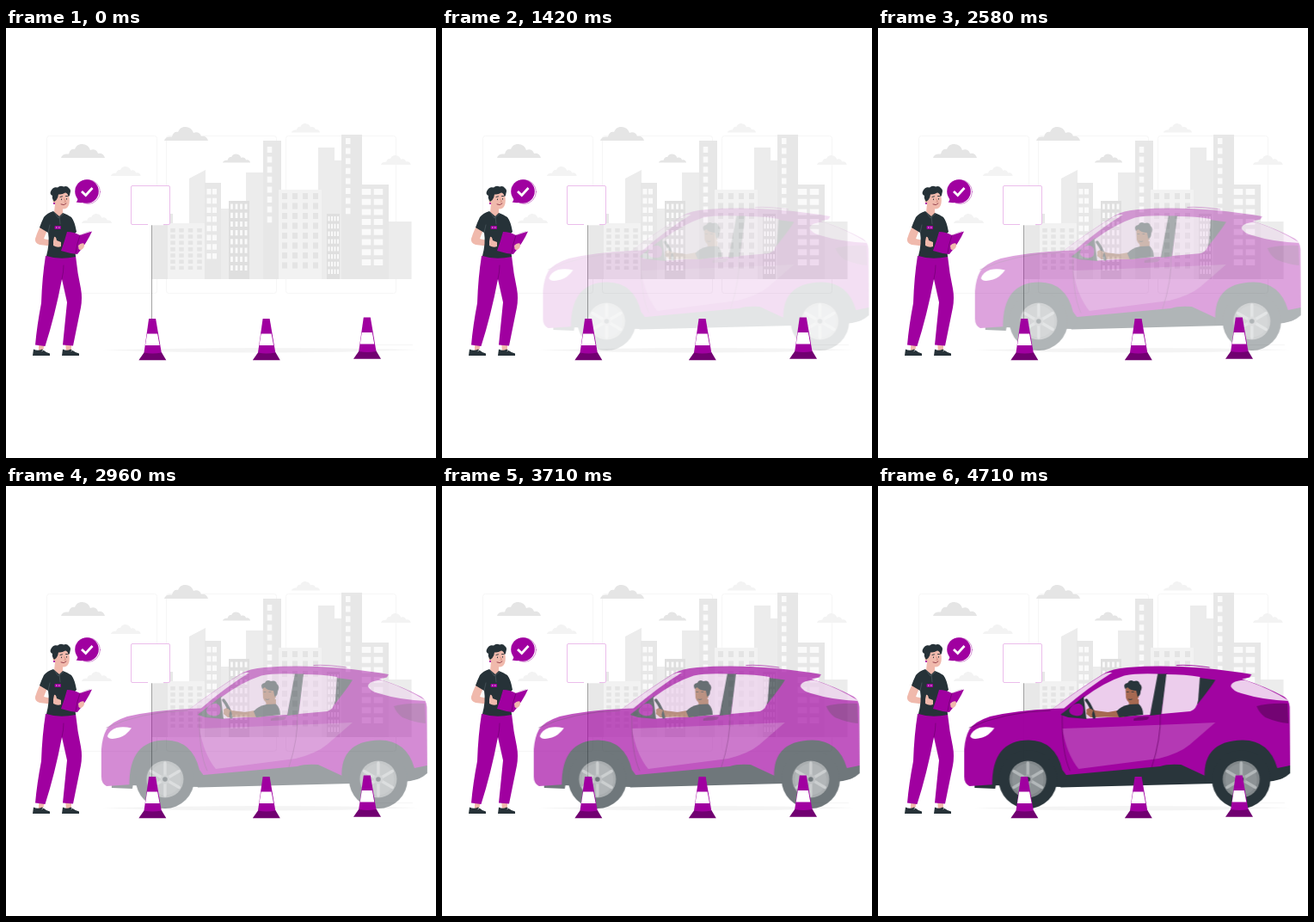
These frames come from a looping animation (500x500 px, 4.75 s). An HTML page:

```html
<!DOCTYPE html>
<html lang="en">
<head>
<meta charset="utf-8">
<title>Driving test</title>
<style>
  html, body { margin: 0; width: 100%; height: 100%; overflow: hidden; background: #fff; }
  svg { display: block; width: 100%; height: 100%; }
  .purple { fill: #a000a0; }
  .deep { fill: #710071; }
  .dark { fill: #263238; }
  .skin { fill: #f0b9ac; }
  .brown { fill: #a5674f; }
  .glass { fill: #eccdec; }
  .line { fill: none; stroke-linecap: round; stroke-linejoin: round; }
  #car { animation: arrive 4750ms ease-in infinite; }
  @keyframes arrive {
    from { opacity: 0; transform: translateX(20px); }
    to { opacity: 1; transform: none; }
  }
</style>
</head>
<body>
<svg viewBox="0 0 500 500">
  <defs>
    <path id="cloud" d="M0 16C1 12 5 11 9 11.500C10 7 13 5 16 6C18 1 22-.3 26 .2C31 .8 33 4 34 7C38 5 42 7 43 11C48 10 50 13 51 16Z"/>
    <g id="cone">
      <path class="deep" d="M-9.500 39H10.500L16 48.300H-16Z"/>
      <path class="purple" d="M-4.200 0H3.800L10.500 39.500Q0 41.500-9.800 39.500Z"/>
      <path fill="#fff" d="M-6.200 17.500H5.800L8.300 31H-8.300Z"/>
    </g>
    <g id="wheel">
      <circle r="34" class="dark"/>
      <circle r="21.500" fill="#7f8689"/>
      <circle r="18.500" fill="#8b9194"/>
      <path class="line" stroke="#b2b7b9" stroke-width="3.400" d="M0-5V-19M0 5V19M4.500-2.500L16.500-9.500M-4.500-2.500L-16.500-9.500M4.500 2.500L16.500 9.500M-4.500 2.500L-16.500 9.500"/>
      <circle r="5.500" fill="#9da2a5"/>
      <circle r="2.800" class="dark"/>
    </g>
  </defs>

  <!-- backdrop -->
  <g fill="none" stroke="#f6f6f6">
    <rect x="47.500" y="125.500" width="128" height="183" rx="3"/>
    <rect x="186.500" y="125.500" width="128" height="183" rx="3"/>
    <rect x="325.500" y="125.500" width="128" height="183" rx="3"/>
    <path d="M430 368.500H473"/>
  </g>
  <path fill="#f4f4f4" d="M112 374.500Q200 372 295 372T480 374Q390 377.500 295 377.500T112 374.500Z"/>

  <!-- city -->
  <path fill="#ececec" d="M213 175L232 165V292H213ZM250 210H260V292H250ZM279 168H300V292H279ZM363 139H382V154H391V292H363ZM445 225H471.500V292H445Z"/>
  <path fill="#e8e8e8" d="M169 229H189V216H194V292H169Z"/>
  <path fill="#e7e7e7" d="M231 180H250V292H231ZM299 131H320V292H299ZM390 124H414V292H390ZM408 182H445V292H408Z"/>
  <path fill="#f2f2f2" d="M188 227H231V292H188ZM317 188H367V292H317Z"/>
  <path fill="#dfdfdf" d="M259 201H283V292H259ZM373 216H388V292H373Z"/>
  <g fill="none" stroke="#fafafa">
    <path stroke-width="5" stroke-dasharray="6.500 4.200" d="M236 187v83M242.500 187v83"/>
    <path stroke-width="2.800" stroke-dasharray="6.200 4" d="M262.500 204.500v79M268 204.500v79M273.500 204.500v79M279 204.500v79"/>
    <path stroke-width="5.500" stroke-dasharray="7 4.600" d="M306.500 138v90M397.700 128v90"/>
    <path stroke-width="10.500" stroke-dasharray="7 4.700" d="M419 187v90M433 187v90"/>
    <path stroke-width="2" stroke-dasharray="5.400 3.400" d="M375.500 219v68M379 219v68M382.500 219v68M386 219v68"/>
  </g>
  <g fill="none" stroke="#e4e4e4">
    <path stroke-width="5.500" stroke-dasharray="4.500 2.800" d="M194 233v48M204 233v48M214.500 233v48M225 233v48"/>
    <path stroke-width="6" stroke-dasharray="7 4.500" d="M324 192v90M336 192v90M348 192v90M360 192v90"/>
  </g>

  <!-- clouds -->
  <g fill="#e5e5e5">
    <use href="#cloud" x="64" y="135"/>
    <use href="#cloud" x="184" y="115"/>
    <use href="#cloud" transform="translate(252 146.500) scale(.63)"/>
  </g>
  <g fill="#f3f3f3">
    <use href="#cloud" transform="translate(122 161) scale(.68)"/>
    <use href="#cloud" transform="translate(332 111) scale(.65)"/>
    <use href="#cloud" transform="translate(436 148) scale(.68)"/>
    <use href="#cloud" transform="translate(88 216) scale(.69)"/>
  </g>

  <!-- sign -->
  <path class="line" stroke="#8c8c8c" stroke-width=".8" d="M169.500 229V340"/>
  <rect x="145.500" y="183.500" width="45" height="45" rx="1.500" fill="#fff" stroke="#ebbdeb"/>
  <path stroke="#fff" stroke-width="1.600" d="M165 228.500H183"/>

  <g id="car">
    <!-- body -->
    <path class="dark" d="M112 345V351L136 352L140 330ZM212 350.500L390 346L380 320H214ZM450 344Q470 343 479 334V322L450 326Z"/>
    <path class="purple" d="M106 349Q100 346 100 338L100 306Q101 292 106 283Q112 274 130 268Q160 261 203 259Q232 237 261 219Q272 212 290 211Q330 208 376 211.500Q412 215 434 219L432 222.500L423 224.500Q450 233 472 245Q478 249 478.500 257L479 325Q470 329 460 331L380 337L352 324Q336 323 328 326L219 336L136 347Z"/>
    <path class="line" stroke="#a000a0" stroke-width=".9" d="M347 208.500Q362 207.500 385 211"/>
    <path class="dark" d="M132.500 348Q132 295.500 175 295.500Q206 296 214 330L220 338L214 350ZM380 346Q374 296 424 295.500Q455 296 464 328L479 325Q479 334 470 340L452 344Z"/>
    <path fill="#b336b3" d="M214 282Q300 279 392 275L362 301Q350 311 326 317L233 329Q219 312 214 282Z"/>
    <path class="line" stroke="#650065" stroke-width=".7" d="M214 264Q213 310 223 331M328 265Q329 294 318 327M106 281Q145 263 200 261"/>
    <path fill="#fff" d="M107 291Q109 284 118 281Q126 279.500 135 281.500Q129 290 121 292.500Q109 296 107 291Z"/>
    <path class="deep" d="M440 256Q456 252 476 253L477 276Q464 275 450 269Q443 264 440 256Z"/>
    <path class="glass" d="M410 233Q410 228 419 226.500Q425 225 430 227Q456 236 478 250Q448 249 422 241Q412 238 410 233Z"/>

    <!-- windows -->
    <path class="glass" d="M203 259Q234 236 261 219.500Q267 216 272 217Q243 235 216 258.500Z"/>
    <path class="dark" d="M212 266L240 244L243 271L221 269ZM323 218.500H336L329 265.500L316 267ZM373 223L392 225.500Q387 234 371 254Z"/>
    <path class="glass" d="M239 246Q263 228 286 220.500Q300 217.500 325 218.500L316 266L242 270.500Z"/>
    <path class="glass" d="M335 219Q358 219 374 222L372 249Q370 260 363 262L329.500 265Z"/>
    <path class="purple" d="M222 261Q225 252 234 253Q240 255 238 264Q236 268 229 267Q222 266 222 261Z"/>
    <path class="deep" d="M297 270.500Q304 267.500 315 268.500Q315 272 307 272.500L297 273Z"/>

    <!-- driver -->
    <path class="brown" d="M291 248H303V259H292Z"/>
    <path class="brown" d="M284 260L267 263L252 261L247 257Q242 259 242 265L247 269L263 268.500L286 269Z"/>
    <path class="dark" d="M277 262Q282 256 292 254L303 253.500Q308 258 308 266L280 269Z"/>
    <path class="brown" d="M287.500 235Q292 231 301 233L303 245Q300 253 294 252.500Q289 251 288 246Z"/>
    <path class="dark" d="M287 236Q284 230 290 229Q292 224.500 297 227Q303 225 304 230Q308 233 305 239Q305 244 301.500 245L300 238Q293 238 290 234Z"/>
    <path class="line" stroke="#263238" stroke-width=".8" d="M289 239.500h2M295 239.500h2M291 248q2 1 4 0"/>
    <path class="line" stroke="#263238" stroke-width="3.400" d="M242 249Q249 258 251 269"/>
    <path class="brown" d="M242 260Q246 257 250 261L248 267Q243 267 242 260Z"/>

    <use href="#wheel" x="174" y="341"/>
    <use href="#wheel" x="422" y="341"/>
  </g>

  <use href="#cone" x="170.300" y="338"/>
  <use href="#cone" x="302.800" y="338"/>
  <use href="#cone" x="420" y="336.500"/>

  <!-- badge -->
  <circle class="line" cx="95.500" cy="190.500" r="14" stroke="#b64ab6" stroke-width=".6"/>
  <circle class="purple" cx="94" cy="190" r="13.800"/>
  <path class="purple" d="M81.500 202.500Q84.500 200 82.500 196L90 203Q86 203.500 81.500 202.500Z"/>
  <path fill="none" stroke="#fff" stroke-width="2.800" d="M88 190L92.700 194.500L100.500 186"/>

  <!-- examiner -->
  <path class="skin" d="M38 366H45L43 376H38ZM69 366H76L76 376H70Z"/>
  <path class="dark" d="M32 373.500Q37 376 42 373.500Q46 377 51 378.500V381H31ZM66 373.500Q71 376 75 373.500Q80 377 85 378.500V381H65Z"/>
  <path class="line" stroke="#fff" stroke-width=".8" d="M42 375.500l2-1.500M76 375.500l2-1.500"/>
  <path class="purple" d="M46 265H81Q83 285 87 303Q89 314 87 325L78 369.500L66 368.500L71 319L65 292Q57 334 45.500 370L34 368.500Q36 346 41 320Q42 290 46 265Z"/>
  <path class="line" stroke="#710071" stroke-width=".7" d="M65 292Q67 284 67 276"/>
  <path class="skin" d="M46 221Q37 234 34 245Q33 250 39 252L56 254L62 254L63 249L59 246L56 248L44 245L50 230Z"/>
  <path class="skin" d="M57 204H66L66 217L61 221L56 215Z"/>
  <path class="dark" d="M55 213Q48 215 44 220Q41 226 39 232L49 238Q51 250 47 265Q62 270 81 266L79 240L82 237Q80 225 76 220Q72 217 66 215L62 219Z"/>
  <path class="line" stroke="#56636a" stroke-width=".6" d="M49 238L51 229M62 219L63 228M56 214L61 221L67 216"/>
  <rect class="purple" x="56.500" y="230" width="7.500" height="4" rx="1"/>
  <path stroke="#fff" stroke-width=".8" d="M58 232h1.500M61 232h1.500"/>
  <path class="skin" d="M58 193L72 191Q74.500 198 73.500 204Q72 210.500 67 210.500Q60 210 58 205Q54 204 54.500 200Q56 197 58 199Z"/>
  <path class="dark" d="M56 202Q53 198 54 195Q50 193 52.500 189Q55 184 60 185.500Q63 182.500 67 184.500Q71 183 73 186Q76 188 74.500 192Q74 196 72.500 196Q72 192 69 191.500Q65 194 61 193.500Q60.500 198 58.500 200Z"/>
  <circle class="purple" cx="56" cy="204" r="1.100"/>
  <g class="line" stroke="#263238" stroke-width=".9">
    <path d="M64.500 199v.7M70.500 198.500v.7M63 196.500l2.500-.7M69.500 195.500l2 0"/>
    <path stroke="#c8806f" stroke-width=".7" d="M68 199l1.400 3-1.400.3"/>
    <path stroke="#8f3744" d="M64 205q3.500 2 6-1"/>
  </g>
  <path fill="#ead7ea" d="M83 243Q90 237 98 235.800L98 239L86 259Z"/>
  <path class="purple" d="M71 237Q79 237 86 241Q92 239 100 236.500Q94 250 83 263Q73 262 64 259Q68 248 71 237Z"/>
  <path class="line" stroke="#710071" stroke-width=".8" d="M86 241Q82 252 81 262"/>
  <path class="skin" d="M84 253Q87 249.500 90.500 250.500Q92 254 89 257Q86 259 84.500 257Z"/>
  <path class="skin" d="M55 248L56 243Q58 242 59 247L64 249V254Q60 256 55 253Z"/>
</svg>
</body>
</html>
```
